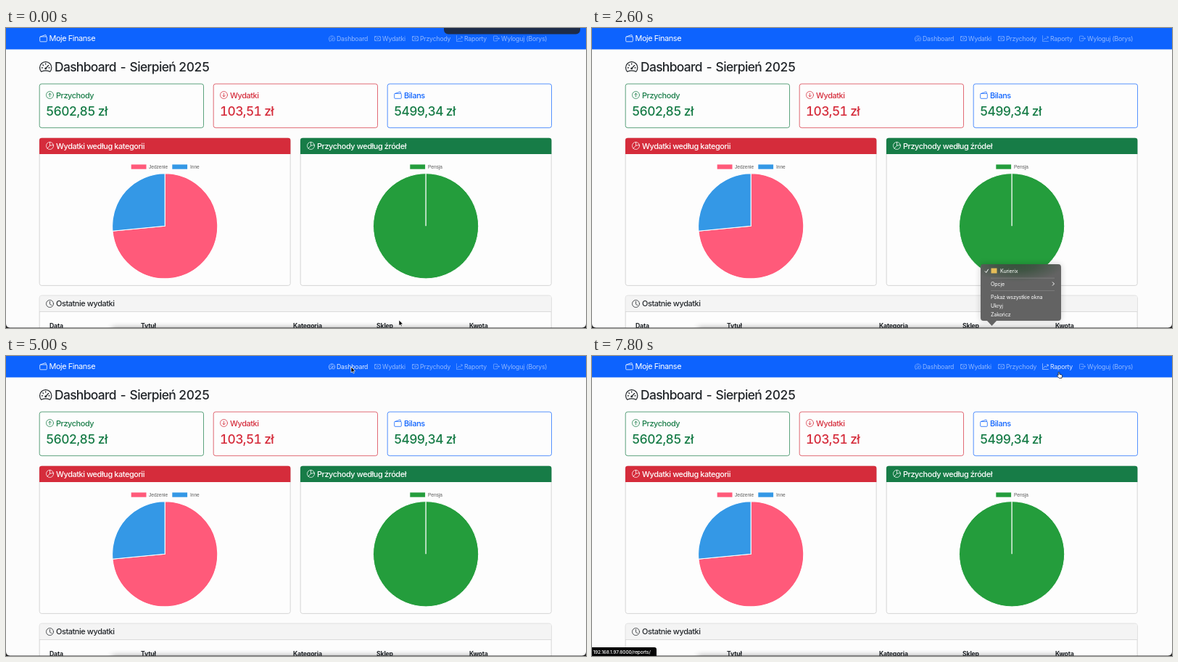
An HTML page for the animation above (8000 ms loop, 800 by 414 pixels).

```html
<!DOCTYPE html>
<html lang="pl">
<head>
<meta charset="utf-8">
<title>Moje Finanse</title>
<style>
  html, body { margin: 0; width: 100%; height: 100%; overflow: hidden; background: #fcfcfc; }
  svg { display: block; width: 100%; height: 100%; }
  text { font-family: Inter, sans-serif; letter-spacing: -.02em; white-space: pre; }
  .heading { letter-spacing: -.037em; font-variant-numeric: tabular-nums; }
  .chart { font-family: "Liberation Sans", Arial, sans-serif; letter-spacing: 0; }
  .icon { fill: none; stroke: currentColor; stroke-width: 1.1; stroke-linecap: round; stroke-linejoin: round; }
</style>
</head>
<body>
<svg id="stage" viewBox="0 0 800 414"></svg>
<script>
const LOOP = 8000, STEP = 200;
const BLUE = '#0d63fe', RED = '#d52c3b', GREEN = '#177c47', INK = '#212529';
const PIE = { x: 579.1, y: 273.3, r: 72.6 };

const icons = {
  wallet: '<path d="M2.5 5h11Q15 5 15 6.500v7Q15 15 13.500 15h-11Q1 15 1 13.500v-7Q1 5 2.500 5L12 1.500Q13.500 1.200 13.500 3v2"/>',
  gauge: '<path d="M2.500 14Q.5 12 .5 9a7.500 7.500 0 0 1 15 0q0 3-2 5-5.500-2.300-11 0ZM8 10l3.600-4M8 3.500v1.300M3 9h1.300M11.800 9h1.300M4.300 5.300l1 1"/><circle cx="8" cy="10" r=".8"/>',
  cash: '<rect x=".7" y="3" width="14.600" height="10.500" rx="1"/><circle cx="8" cy="8.200" r="2.200"/><path d="M.7 6Q3.500 6 3.500 3M15.300 6q-2.800 0-2.800-3M.7 10.500q2.800 0 2.800 3M15.300 10.500q-2.800 0-2.800 3"/>',
  graph: '<path d="M.7 1v14H15M3 12l4-5 3 2.500L14.500 4M11 3.500h3.500V7"/>',
  exit: '<path d="M10 5V3q0-1-1-1H2Q1 2 1 3v10q0 1 1 1h7q1 0 1-1v-2M5.500 8H15M12.500 5.500 15 8l-2.500 2.500"/>',
  up: '<circle cx="8" cy="8" r="7.300"/><path d="M8 11.500v-7M5 7.500l3-3 3 3"/>',
  down: '<circle cx="8" cy="8" r="7.300"/><path d="M8 4.500v7M5 8.500l3 3 3-3"/>',
  pie: '<circle cx="8" cy="8" r="7.300"/><path d="M8 .7V8l-5.200 5.200M8 8l7-2"/>',
  clock: '<circle cx="8" cy="8" r="7.300"/><path d="M8 3.500V9l3.500 2"/>'
};

const text = (x, y, size, content, color, extra = '') =>
  `<text x="${x}" y="${y}" font-size="${size}" fill="${color}" ${extra}>${content}</text>`;
const heading = (x, y, size, content, color, weight = 550) =>
  text(x, y, size, content, color, `class="heading" font-weight="${weight}"`);
const label = (x, y, content, color, weight = 400) =>
  text(x, y, 6.54, content, color, `class="chart" font-weight="${weight}"`);
const rect = (x, y, w, h, fill, extra = '') =>
  `<rect x="${x}" y="${y}" width="${w}" height="${h}" fill="${fill}" ${extra}/>`;
const icon = (name, x, y, size, color) =>
  `<g class="icon" color="${color}" transform="translate(${x} ${y}) scale(${size / 16})">${icons[name]}</g>`;

const nav = [
  { x: 445, end: 500, icon: 'gauge', name: 'Dashboard' },
  { x: 508, end: 551, icon: 'cash', name: 'Wydatki' },
  { x: 560, end: 613, icon: 'cash', name: 'Przychody' },
  { x: 621, end: 664, icon: 'graph', name: 'Raporty' },
  { x: 672, end: 748, icon: 'exit', name: 'Wyloguj (Borys)' }
];

function summaryCard(x, color, iconName, title, amount, amountColor) {
  return rect(x + .2, 77.1, 226.3, 60.6, '#fdfdfd', `rx="3" stroke="${color}" stroke-width=".7"`) +
    icon(iconName, x + 9, 87, 11, color) +
    heading(x + 23, 96.500, 10.9, title, color) +
    heading(x + 9, 120.600, 17.4, amount, amountColor);
}

function chartCard(x, color, title) {
  return rect(x + .2, 152.2, 346, 203.2, '#fdfdfd', 'rx="3" stroke="#cdcdcd" stroke-width=".8"') +
    `<path d="M${x} 174v-19q0-3.300 3.300-3.300h339.800q3.300 0 3.300 3.300v19Z" fill="${color}"/>` +
    icon('pie', x + 9, 157, 11, '#fff') +
    heading(x + 23, 167, 10.9, title, '#fff');
}

function slice(cx, from, to, color) {
  const point = deg => {
    const a = (deg - 90) * Math.PI / 180;
    return `${cx + PIE.r * Math.cos(a)} ${PIE.y + PIE.r * Math.sin(a)}`;
  };
  return `<path d="M${cx} ${PIE.y}L${point(from)}A${PIE.r} ${PIE.r} 0 ${+(to - from > 180)} 1 ${point(to)}Z"
    fill="${color}" stroke="#fff" stroke-width="1.1"/>`;
}

function contextMenu() {
  const rows = [['Opcje', 355.5], ['Pokaż wszystkie okna', 373.5], ['Ukryj', 385.5], ['Zakończ', 397.5]];
  const line = y => rect(550, y, 88, .6, '#8b8b8b');
  return '<g id="menu">' +
    rect(536, 326, 111, 78, '#000', 'rx="4" opacity=".2" filter="url(#soft)"') +
    '<path d="M540 326h103q4 0 4 4v70q0 4-4 4h-85l-6.500 7-6.500-7h-5q-4 0-4-4v-70q0-4 4-4Z" fill="#636363"/>' +
    rect(537, 326, 109, 40, 'url(#tint)') +
    '<path d="M542 335.500l1.700 2 3-4.700M635 350.500l2.500 2.500-2.500 2.500" fill="none" stroke="#fff" stroke-width="1"/>' +
    rect(550.5, 331.5, 8, 7, '#e5bd58') +
    text(563, 337.700, 7.1, 'Kurierix', '#fff') + line(344.8) + line(362) +
    rows.map(([name, y]) => text(550, y, 7.1, name, '#fff')).join('') + '</g>';
}

function tooltip() {
  return '<g id="tooltip">' +
    '<path d="M586 297h61q3.500 0 3.500 3.500v18q0 3.500-3.500 3.500h-61q-3 0-3-3.500v-6.500l-3-2.500 3-2.500v-6.500q0-3.500 3-3.500Z" fill="#000" fill-opacity=".84"/>' +
    label(586, 306, 'Pensja', '#fff', 700) +
    rect(586.5, 312, 6.5, 6.5, '#249d3c', 'stroke="#fff"') +
    label(594, 317.500, 'Pensja: 5602.85 zł', '#fff') + '</g>';
}

const stage = document.getElementById('stage');
stage.innerHTML = `<defs>
    <filter id="soft" x="-20%" y="-200%" width="140%" height="500%"><feGaussianBlur stdDeviation="4"/></filter>
    <radialGradient id="tint" cx=".45" cy="0" r=".6">
      <stop stop-color="#38523d"/><stop offset=".4" stop-color="#38523d" stop-opacity=".8"/>
      <stop offset="1" stop-color="#38523d" stop-opacity="0"/>
    </radialGradient>
  </defs>` +
  rect(0, 0, 800, 414, '#fcfcfc') + rect(0, 0, 800, 29.5, BLUE) +
  icon('wallet', 46, 8.5, 11, '#fff') + heading(59.5, 18.4, 10.9, 'Moje Finanse', '#fff', 420) +
  nav.map(item => `<g class="nav">${icon(item.icon, item.x, 10, 9, '#fff')}${text(item.x + 11, 17.600, 8.7, item.name, '#fff')}</g>`).join('') +
  icon('gauge', 46, 45, 17.4, INK) + heading(67, 59.6, 17.4, 'Dashboard - Sierpień 2025', INK) +
  summaryCard(46, GREEN, 'up', 'Przychody', '5602,85 zł', GREEN) +
  summaryCard(286, RED, 'down', 'Wydatki', '103,51 zł', RED) +
  summaryCard(526, BLUE, 'wallet', 'Bilans', '5499,34 zł', GREEN) +
  chartCard(46, RED, 'Wydatki według kategorii') +
  chartCard(406, GREEN, 'Przychody według źródeł') +
  rect(172.7, 188.4, 20.8, 6.3, '#ff5a7a') + label(197, 193.600, 'Jedzenie', '#5c5c5c') +
  rect(229.3, 188.4, 20.8, 6.3, '#3498e6') + label(254, 193.600, 'Inne', '#5c5c5c') +
  rect(557.3, 188.4, 20.8, 6.3, '#249d3c') + label(582, 193.600, 'Pensja', '#5c5c5c') +
  slice(219.2, 0, 264.5, '#ff5a7a') + slice(219.2, 264.5, 360, '#3498e6') +
  `<circle id="income" cx="${PIE.x}" cy="${PIE.y}" r="${PIE.r}" stroke="#fff"/>` +
  `<path id="seam" d="M${PIE.x} ${PIE.y}v-${PIE.r}" stroke="#fff" stroke-width="1.300"/>` +
  rect(46.2, 369.2, 706, 60, '#fdfdfd', 'rx="3" stroke="#cdcdcd" stroke-width=".8"') +
  rect(46.6, 369.6, 705.2, 21.6, '#f4f4f4') + rect(46, 391, 706, .8, '#d4d4d4') +
  icon('clock', 55, 375, 11, INK) + heading(69, 384.2, 10.9, 'Ostatnie wydatki', INK, 500) +
  rect(146, 414, 510, 10, '#000', 'opacity=".4" filter="url(#soft)"') +
  [[60, 'Data'], [186, 'Tytuł'], [396, 'Kategoria'], [511, 'Sklep'], [639, 'Kwota']]
    .map(([x, name]) => text(x, 414.4, 8.7, name, INK, 'font-weight="700"')).join('') +
  '<path d="M0 408v6h800v-6q0 5.400-5.400 5.400H5.400Q0 413.400 0 408Z" fill="#222"/>' +
  tooltip() +
  '<g id="banner">' + rect(0, -12, 188, 20.4, '#1d2c49', 'rx="6"') + '</g>' +
  '<g id="status"><path id="statusBox" fill="#050505"/>' + text(1.5, 410.600, 6.54, '', '#fff', 'id="statusText" font-weight="500"') + '</g>' +
  contextMenu() +
  `<g id="cursor" stroke-width=".7" stroke-linejoin="round">
    <path id="arrow" d="M0 0V8l1.900-1.700L3.100 9l1.300-.5-1.200-2.700h2.500Z" fill="#000" stroke="#fff"/>
    <path id="hand" d="M-.8 4.500V.6Q0-.5.8.6v2.600l2.900.7q1 .3.800 1.500L4 8.500H.3L-2.500 5.300q0-1.200 1.700-.8Z" fill="#fff" stroke="#000"/>
  </g>`;

const el = id => document.getElementById(id);
const navItems = [...document.querySelectorAll('.nav')];
const show = (id, visible) => el(id).setAttribute('display', visible ? 'inline' : 'none');
const move = (id, x, y) => el(id).setAttribute('transform', `translate(${x} ${y})`);

const cursorPath = [
  [0, 542, 403], [200, 542, 403], [400, 549, 375], [600, 564, 305], [800, 572, 215],
  [1000, 573.5, 139.5], [1400, 574, 145], [1800, 564, 315], [2200, 551, 407], [2400, 551, 418],
  [2800, 553, 418], [3400, 571, 391], [3600, 571, 391], [3800, 569, 380], [4200, 535, 245],
  [4800, 479, 36], [5000, 476, 15], [6000, 476, 16], [6200, 485, 18], [6400, 508, 37],
  [6800, 568, 34], [7200, 626, 24], [7600, 644, 22], [8000, 644, 22]
];
const bannerPath = [[0, 604], [600, 604], [800, 612], [1000, 635], [1200, 802], [8000, 802]];

function along(path, t) {
  const i = Math.max(1, path.findIndex(key => key[0] >= t));
  const [a, b] = [path[i - 1], path[i]];
  const k = Math.max(0, (t - a[0]) / (b[0] - a[0]));
  return a.slice(1).map((v, n) => v + (b[n + 1] - v) * k);
}

const inPie = ([x, y]) => Math.hypot(x - PIE.x, y - PIE.y) < PIE.r;
const navAt = ([x, y]) => y > 8 && y < 25 ? nav.findIndex(item => x >= item.x && x <= item.end) : -1;

function statusAt(t) {
  if (t >= 5200 && t < 6800) return ['dashboard', 98];
  if (t >= 7400) return ['reports', 88];
  return null;
}

function render(time) {
  const t = Math.floor(time % LOOP / STEP) * STEP;
  const here = along(cursorPath, t), before = along(cursorPath, Math.max(0, t - STEP));
  const menuOpen = t >= 2400 && t < 3800;

  const pieHover = !menuOpen && (inPie(here) || inPie(before));
  el('income').setAttribute('fill', pieHover ? '#0aa82a' : '#249d3c');
  el('seam').setAttribute('stroke-dasharray', pieHover ? '1.500 .7' : 'none');
  show('tooltip', pieHover);

  const hovered = navAt(here), previous = navAt(before);
  navItems.forEach((item, i) => item.setAttribute('opacity', i === hovered ? .88 : i === previous ? .74 : .55));

  const status = statusAt(t);
  show('status', status);
  if (status) {
    const [page, width] = status;
    el('statusText').textContent = `192.168.1.97:8000/${page}/`;
    el('statusBox').setAttribute('d', `M0 402h${width - 2}q3 0 3 3v9H0Z`);
  }

  show('menu', menuOpen);
  move('banner', along(bannerPath, t)[0], 0);
  move('cursor', ...here);
  const hand = hovered >= 0 && previous >= 0;
  show('hand', hand);
  show('arrow', !hand);
}

const start = performance.now();
function tick() {
  render(performance.now() - start);
  requestAnimationFrame(tick);
}
tick();
</script>
</body>
</html>
```
